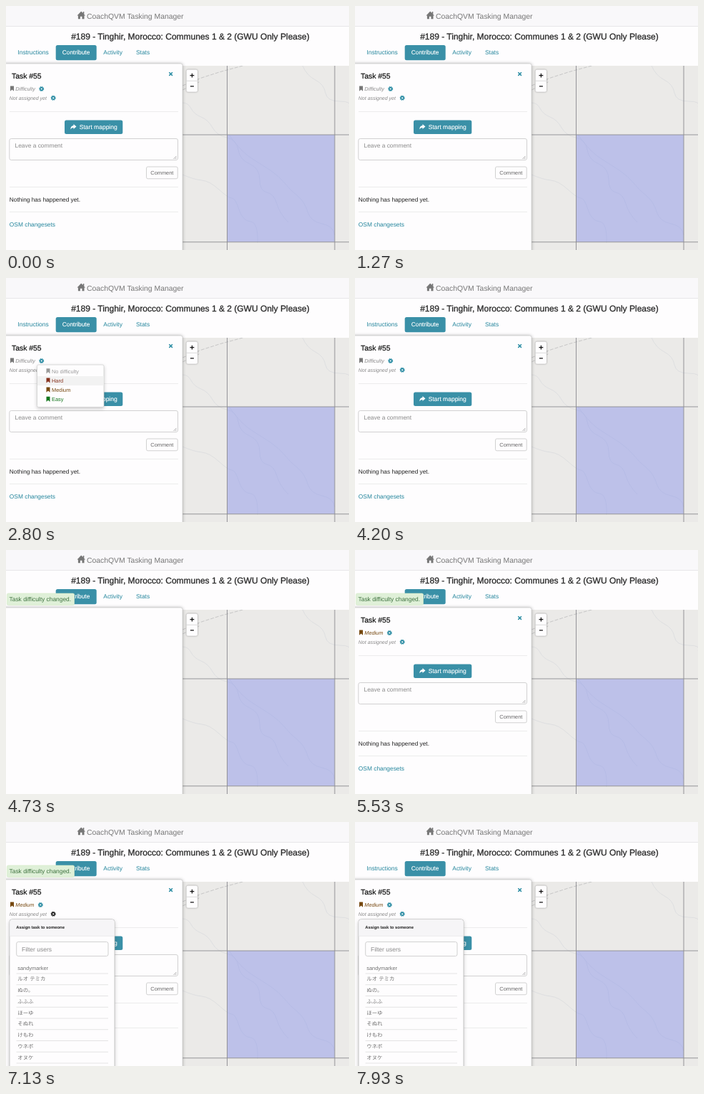
Animation, 480 px wide and 343 px high, one loop 8 s. Source, as an HTML page:

```html
<!DOCTYPE html>
<html lang="en">
<head>
<meta charset="utf-8">
<title>Tasking Manager</title>
<style>
  html, body { margin: 0; width: 100%; height: 100%; overflow: hidden; background: #fefdfe; }
  svg { display: block; width: 100vw; height: 100vh; }
  text { font: 8.4px "Liberation Sans", Arial, sans-serif; text-rendering: geometricPrecision; fill: #333; white-space: pre; }

  .link { fill: #23859c; }
  .muted { fill: #888; }
  .white { fill: #fff; stroke: #fff; stroke-width: .15px; }
  .brand { font-size: 10.4px; fill: #777; }
  .title { font-size: 12px; fill: #2a2a2a; stroke: #2a2a2a; stroke-width: .3px; }
  .task { font-size: 10.4px; fill: #111; stroke: #111; stroke-width: .2px; }
  .note { font-size: 7px; font-style: italic; }
  .level { font-size: 7.3px; }
  .small { font-size: 7.4px; }
  .popTitle { font-size: 5.9px; font-weight: bold; fill: #222; }
  .rows text { font-size: 7.4px; font-family: "Liberation Sans", "Noto Sans CJK JP", "Noto Sans CJK", sans-serif; fill: #707070; }
  .none { fill: #999; color: #999; }
  .hard { fill: #86301c; color: #86301c; }
  .medium { fill: #76480f; color: #76480f; }
  .easy { fill: #12761c; color: #12761c; }
  .rule { stroke: #ececec; }
  .field { fill: #fefdfe; stroke: #ccc; stroke-width: .9px; }
  .box { filter: drop-shadow(0 2px 2.5px rgba(0, 0, 0, .2)); }
  .gear { color: #2b8ca3; }

  .menu, .hover, .before, .after, .gearOne, .gearTwo { animation: 8s step-end infinite; }
  .menu { animation-name: menu; }
  .hover { animation-name: hover; }
  .before { animation-name: before; }
  .after { animation-name: after; }
  .gearOne { animation-name: gearOne; }
  .gearTwo { animation-name: gearTwo; }
  .content { animation: content 8s linear infinite; }
  .flash { animation: flash 8s linear infinite; }
  .popover { animation: popover 8s linear infinite; }

  @keyframes menu { 0%, 48.3% { visibility: hidden; } 28.3% { visibility: visible; } }
  @keyframes hover {
    0% { opacity: 0; transform: none; }
    32% { opacity: 1; transform: none; }
    37.5% { opacity: 1; transform: translateY(13.2px); }
  }
  @keyframes before { 0% { visibility: visible; } 59% { visibility: hidden; } }
  @keyframes after { 0% { visibility: hidden; } 59% { visibility: visible; } }
  @keyframes gearOne { 0%, 32% { color: #2b8ca3; } 26.6% { color: #222; } }
  @keyframes gearTwo { 0%, 93% { color: #2b8ca3; } 81% { color: #222; } }
  @keyframes content { 0%, 55.6% { opacity: 1; } 57.6%, 60.5% { opacity: 0; } 63%, 100% { opacity: 1; } }
  @keyframes flash { 0%, 53.5% { opacity: 0; } 54.5%, 92% { opacity: 1; } 95.5%, 100% { opacity: 0; } }
  @keyframes popover { 0%, 84% { opacity: 0; } 86%, 100% { opacity: 1; } }
</style>
</head>
<body>
<svg viewBox="0 0 480 343" preserveAspectRatio="none">
  <defs>
    <path id="mark" d="M0 0h5v7.2l-2.5-2.3L0 7.2z" fill="currentColor"/>
    <g id="gear" fill="none" stroke="currentColor">
      <circle r="1.9" stroke-width="1.6"/>
      <circle r="2.9" stroke-width="1.3" stroke-dasharray="1.2 1.078"/>
    </g>
    <clipPath id="mapArea"><path d="M240 84h240v259H240z"/></clipPath>
  </defs>

  <rect width="480" height="28" fill="#f9f8fa"/>
  <path d="M0 28.5h480" stroke="#e7e6e8"/>
  <path d="M99.5 13.4 105.200 7.500l2.500 2.500V8h1.600v3.700l1.700 1.700h-1.500V18.300h-3v-3.500h-2.600v3.500h-3v-4.900z" fill="#777"/>
  <text class="brand" x="113" y="17.5">CoachQVM Tasking Manager</text>
  <text class="title" x="91.200" y="46.600">#189 - Tinghir, Morocco: Communes 1 &amp; 2 (GWU Only Please)</text>

  <text class="link" x="16.300" y="68.300" style="font-size:8.5px">Instructions</text>
  <rect x="69.700" y="55" width="57" height="21.300" rx="2.500" fill="#3a90a7"/>
  <text class="white" x="78.700" y="68.300">Contribute</text>
  <text class="link" x="136.300" y="68.300">Activity</text>
  <text class="link" x="182" y="68.300">Stats</text>

  <g clip-path="url(#mapArea)">
    <path d="M240 84h240v259H240z" fill="#ebeae8"/>
    <g fill="none" stroke="#dcdddf" stroke-width=".9">
      <path d="M247 136q8 0 12 8t14 12 16 15 20 14 16 17 16 20 14 22 10 18 14 16 16 26"/>
      <path d="M312 181q10 14 18 22t18 14 22 14 20 18 18 18 14 22 20 17 18 16"/>
      <path d="M247 237q16 7 27 8t24 13 18 12 10 16 16 17 10 30"/>
      <path d="M415 84q6 14 18 20t14 18 20 12 13 8"/>
    </g>
    <path d="M247 112 272 101.500 300 92.500 335 83M247 118 272 106M262 95l8 10" fill="none" stroke="#c6c6c6" stroke-dasharray="5 2"/>
    <path d="M309.500 181h150.500v150.800h-150.500z" fill="#8f99ec" fill-opacity=".5"/>
    <path d="M309.500 84v259M460 84v259M247 181h233M247 331.800h233" stroke="#8b8b8f" stroke-width=".9"/>
  </g>
  <g style="filter:drop-shadow(0 .5px 1.3px rgba(0,0,0,.4))">
    <rect x="252.500" y="89.500" width="15.500" height="31.300" rx="2.500" fill="#fefdfe"/>
  </g>
  <path d="M252.500 105.300h15.500" stroke="#ccc" stroke-width=".7"/>
  <path d="M257.500 97.700h5.800M260.400 94.800v5.800M257.900 112.900h5" stroke="#111" stroke-width="1.2"/>

  <path d="M-4 81H244.500q2.500 0 2.500 2.500V350H-4z" fill="#fefdfe" stroke="#ccc" stroke-width=".7" style="filter:drop-shadow(0 0 2px rgba(0,0,0,.28))"/>

  <g class="content">
    <text class="task" x="8" y="102.300">Task #55</text>
    <path d="M228.300 93.300l4.600 4.600m0-4.600-4.600 4.600" stroke="#2b8ca3" stroke-width="1.500"/>
    <g class="before">
      <use href="#mark" x="6" y="112.500" color="#777"/>
      <text class="note level muted" x="13.300" y="118.700">Difficulty</text>
      <g class="gearOne"><use href="#gear" x="49.700" y="116.500"/></g>
    </g>
    <g class="after">
      <use href="#mark" x="6" y="112.500" class="medium"/>
      <text class="note level medium" x="13.300" y="118.700">Medium</text>
      <use href="#gear" x="48.300" y="116.500" class="gear"/>
    </g>
    <text class="note muted" x="4.800" y="131.800">Not assigned yet</text>
    <g class="gearTwo"><use href="#gear" x="66.200" y="129.300"/></g>

    <path class="rule" d="M5 148.500h236M5 254.500h236M5 289.500h236"/>
    <rect x="82" y="160.500" width="81.300" height="19.500" rx="2.500" fill="#3a90a7"/>
    <path d="M90.300 173.500q.2-5.200 4.200-5.400v-2l4 3.500-4 3.500v-2q-2.800 0-4.200 2.400z" fill="#fff"/>
    <text class="white" x="102.800" y="173.400" style="font-size:8.5px">Start mapping</text>

    <rect class="field" x="4.800" y="186.500" width="235.700" height="30" rx="2.500"/>
    <path d="M234.500 215l4-4m-1.700 4 1.700-1.700" stroke="#888" stroke-width=".7"/>
    <text class="muted" x="12.500" y="198.700">Leave a comment</text>
    <rect class="field" x="196.500" y="226" width="43.700" height="16.800" rx="2"/>
    <text class="small" x="202.300" y="237.200" style="fill:#666">Comment</text>
    <text x="4.800" y="275" style="font-size:8.3px;fill:#222">Nothing has happened yet.</text>
    <text class="link" x="4.800" y="310">OSM changesets</text>
  </g>

  <g class="menu">
    <rect class="box" x="43.500" y="122" width="93.500" height="59.500" rx="2" fill="#fefdfe" stroke="#ccc" stroke-width=".7"/>
    <rect class="hover" x="44" y="138" width="92.500" height="13" fill="#f2f2f2"/>
    <g id="levels"></g>
  </g>

  <g class="flash">
    <rect x="1.300" y="61" width="94.300" height="16.500" rx="2" fill="#dff0d8" stroke="#d6e9c6" stroke-width=".6"/>
    <text x="4.600" y="72.300" style="fill:#3c703d">Task difficulty changed.</text>
  </g>

  <g class="popover">
    <rect class="box" x="5" y="136.800" width="147" height="230" rx="3.500" fill="#fefdfe" stroke="#bbb" stroke-width=".8"/>
    <path d="M5.400 160v-19.500q0-3.300 3.300-3.300h139.600q3.300 0 3.300 3.300V160z" fill="#f6f5f7"/>
    <path class="rule" d="M5.400 160.300h146.200"/>
    <text class="popTitle" x="14.200" y="150.300">Assign task to someone</text>
    <rect class="field" x="14.700" y="168.500" width="128.300" height="20" rx="2.500"/>
    <text class="muted" x="22" y="181.500" style="font-size:8.5px">Filter users</text>
    <g id="users" class="rows"></g>
  </g>
</svg>
<script>
  const levels = [['none', 'No difficulty'], ['hard', 'Hard'], ['medium', 'Medium'], ['easy', 'Easy']];
  const users = ['sandymarker', 'ルオ テミカ', 'ぬの。', 'ふふふ', 'ほーゆ', 'そぬれ', 'けもわ', 'ウネボ', 'オヌケ'];
  const fill = (id, items, draw) => {
    document.getElementById(id).innerHTML = items.map(draw).join('');
  };

  fill('levels', levels, ([name, label], i) => {
    const y = 133.6 + i * 13.2;
    return `<use href="#mark" class="${name}" x="56.500" y="${y - 6.4}"/>
      <text class="small ${name}" x="64" y="${y}">${label}</text>`;
  });

  fill('users', users, (name, i) => {
    const y = 207.5 + i * 15.75;
    return `<text x="16.300" y="${y}">${name}</text>
      <path d="M14.500 ${y + 5.5}h128.500" stroke="#ddd" stroke-width=".8"/>`;
  });
</script>
</body>
</html>
```
